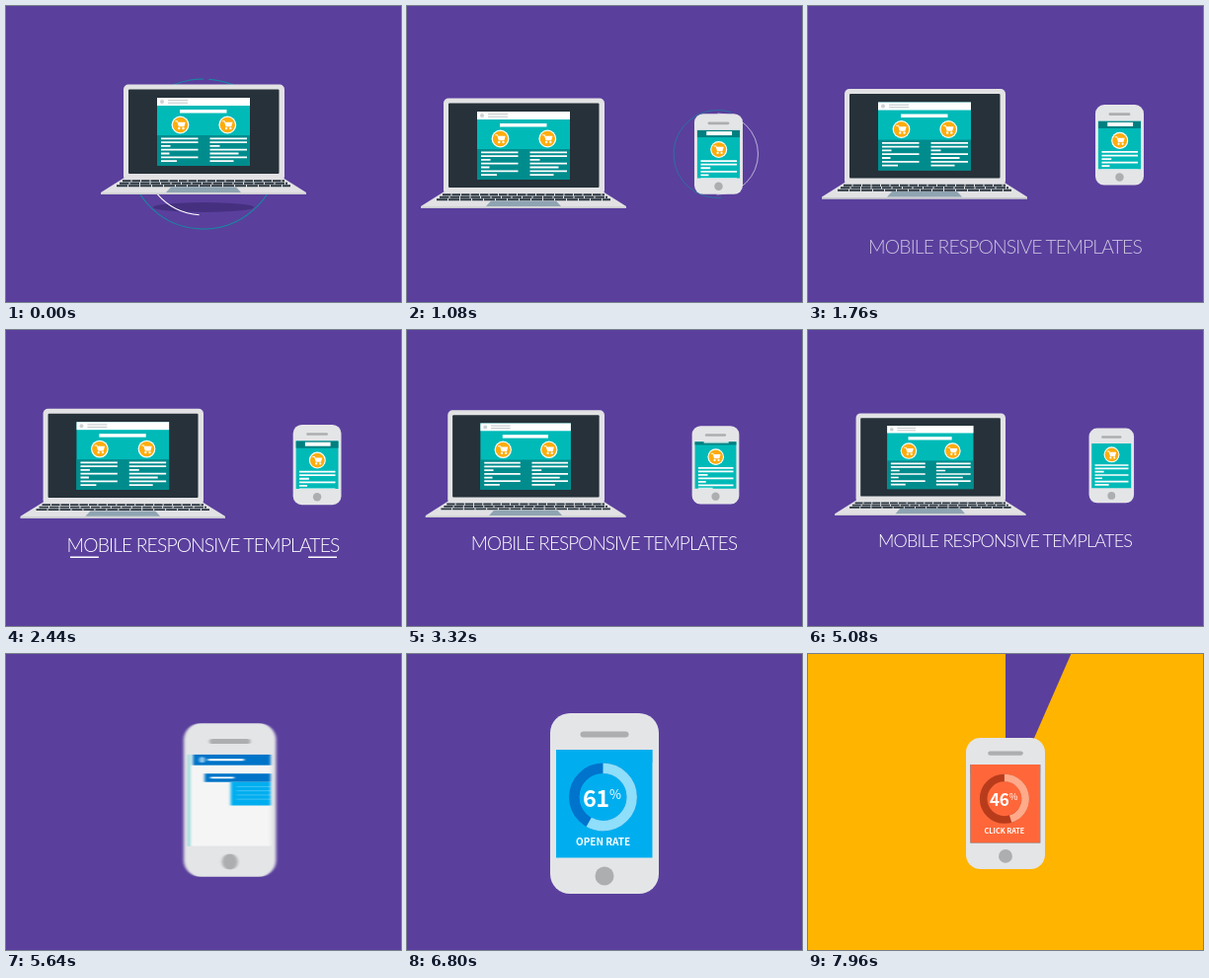
Recreate the animation shown at these times as an HTML page. Size 400 by 300 pixels, loop 8 s.

```html
<!DOCTYPE html>
<html lang="en">
<head>
<meta charset="utf-8">
<title>Mobile responsive templates</title>
<style>
  html, body { margin: 0; width: 100%; height: 100%; overflow: hidden; background: #5a3f9d; }
  svg { display: block; width: 100vw; height: 100vh; }
  .headline { font: 300 19.4px Lato, "Open Sans", sans-serif; letter-spacing: -.88px; fill: #fff; text-anchor: middle; }
  .gauge { font-family: "Noto Sans CJK JP", "Noto Sans CJK SC", "Noto Sans", sans-serif; fill: #fff; }
  .value { font-size: 23.5px; font-weight: 600; letter-spacing: -.6px; text-anchor: end; }
  .percent { font-size: 13px; font-weight: 500; }
  .label { font-size: 10px; font-weight: 600; text-anchor: middle; }
  .ring { fill: none; stroke-width: 10.5; }
  .orbit { fill: none; stroke-width: 1; }
  .teal { stroke: #108ea0; }
  .white { stroke: #fff; }
  #orbits .orbit { stroke-width: .6; }
  .copy { fill: none; stroke: #fff; }
</style>
</head>
<body>
<svg id="stage" viewBox="0 0 400 300"></svg>
<script>
const gauge = (id, back, track, light, label) => `
  <g id="${id}" class="gauge">
    <rect class="back" x="-50" y="-56" width="100" height="112" fill="${back}"/>
    <g class="dial">
      <g transform="translate(-1.5 -6.5)">
        <circle class="ring" r="29.2" stroke="${track}"/>
        <circle class="ring arc" r="29.2" stroke="${light}" pathLength="360"/>
      </g>
      <text class="value" x="4.5" y="3.5"></text>
      <text class="percent" x="5" y="-4.5">%</text>
      <text class="label" x="-1.5" y="42.5">${label}</text>
    </g>
  </g>`;

const orbit = (id, color, x, y, r) =>
  `<g transform="translate(${x} ${y})"><circle id="${id}" class="orbit ${color}" r="${r}" pathLength="360"/></g>`;

// Evenly spaced lines of body copy.
const copy = (x, y, step, weight, widths) =>
  `<path class="copy" stroke-width="${weight}" d="${widths.map((w, i) => `M${x} ${y + i * step}h${w}`).join('')}"/>`;

document.getElementById('stage').innerHTML = `
<defs>
  <clipPath id="screen"><rect x="-49" y="-54.5" width="97.5" height="109.5"/></clipPath>
  <filter id="smear" filterUnits="userSpaceOnUse" x="0" y="0" width="400" height="300" color-interpolation-filters="sRGB">
    <feGaussianBlur id="blur" stdDeviation="0"/>
  </filter>
  <g id="cart">
    <circle r="8.9" fill="#fff"/><circle r="7.7" fill="#ffac0c"/>
    <path d="M-5.2-4.2h2.400l.7 1.400h7.300l-1.300 4.600h-5.600l-1.500-5h-2z" fill="#fff"/>
    <circle cx="-1.200" cy="3.500" r="1.200" fill="#fff"/><circle cx="3" cy="3.500" r="1.200" fill="#fff"/>
  </g>
</defs>
<rect width="400" height="300" fill="#5a3f9d"/>
<circle id="wipe" r="150" fill="none" stroke="#ffb400" stroke-width="300" pathLength="360"/>
<ellipse id="shadow" cx="200" cy="204" rx="51" ry="5" fill="#45307f"/>
${orbit('bigTeal', 'teal', 200, 150, 76)}
${orbit('bigWhite', 'white', 200, 150, 62)}
<g id="orbits">
  ${orbit('smallTeal', 'teal', 0, 0, 44.5)}
  ${orbit('smallWhite', 'white', 0, 0, 41)}
</g>
<g id="desk">
  <g id="laptop">
    <rect x="119" y="79.500" width="163" height="98" rx="5" fill="#e2e2e4"/>
    <rect x="124" y="84.500" width="152.500" height="85.500" rx="1" fill="#263139"/>
    <rect x="153" y="93" width="94" height="69" fill="#00bab8"/>
    <rect x="153" y="131" width="94" height="31" fill="#008c8d"/>
    <rect x="153" y="93" width="94" height="8" fill="#fff"/>
    <circle cx="158" cy="97" r="2" fill="#ccd1d4"/>
    <path d="M164 95.700h20M164 98.200h20" stroke="#c3c8cb"/>
    <rect x="176" y="105" width="47.500" height="3.500" fill="#fff"/>
    <use href="#cart" x="176.500" y="120.500"/><use href="#cart" x="224.300" y="120.500"/>
    ${copy(157, 134.3, 3.8, 1.8, [37.5, 37.5, 9.5, 37.5, 8.5, 37.5, 16])}
    ${copy(206.5, 134.3, 3.8, 1.8, [37.5, 37.5, 10, 37.5, 29, 37.5, 24])}
    <path d="M119 174.500H281L304 189V191H96V189Z" fill="#e2e2e4"/>
    <path d="M96 189.500H304V191H96Z" fill="#c9cbce"/>
    <g stroke="#2b3640" stroke-width="1.900">
      <path d="M118 177.200H282" stroke-dasharray="8.500 1"/>
      <path d="M115 179.700H285" stroke-dasharray="9.500 1"/>
      <path d="M112 182.200H288" stroke-dasharray="11 1"/>
    </g>
    <path d="M167 183.500H233L238 189H162Z" fill="#8fa4b2"/>
  </g>
  <g id="title">
    <text class="headline" x="199.500" y="225">MOBILE RESPONSIVE TEMPLATES</text>
    <path id="rules" class="copy" stroke-width="1.400"/>
  </g>
</g>
<g id="phoneLayer">
  <g id="phone">
    <rect x="-55" y="-91.500" width="110" height="183" rx="20" fill="#e4e5e7"/>
    <rect x="-24.500" y="-73" width="49" height="6" rx="3" fill="#acaeb0"/>
    <circle cy="73.500" r="9.500" fill="#acaeb0"/>
    <g clip-path="url(#screen)">
      <g id="shop">
        <rect x="-49" y="-54.500" width="97.500" height="150" fill="#00bab8"/>
        <g id="scroll">
          <rect x="-49" y="-54.500" width="97.500" height="16.500" fill="#007f80"/>
          <rect x="-28" y="-51.500" width="58" height="9" fill="#fff"/>
          <use href="#cart" transform="translate(0 -10) scale(2.150)"/>
          ${copy(-41, 16, 8, 4, [82, 82, 22, 82, 18, 82, 34])}
        </g>
      </g>
      <rect id="mail" x="-49" y="-54.500" width="97.500" height="109.500" fill="#f5f5f5"/>
      <g id="header">
        <rect x="-49" y="-54.500" width="97.500" height="13" fill="#0074c8"/>
        <circle cx="-38" cy="-48" r="3.500" fill="#8fc6ec"/>
        <path class="copy" stroke-width="2.500" d="M-31-48h43"/>
      </g>
      <g id="card">
        <rect x="-43" y="-31.500" width="86" height="10" fill="#0074c8"/>
        <path class="copy" stroke-width="2" d="M-36-26.500h28"/>
      </g>
      <g id="block">
        ${gauge('open', '#00aeef', '#0073cd', '#8fdefa', 'OPEN RATE')}
        <g id="stripes">${copy(-36, -16, 5, 1, [70, 66, 70, 40])}</g>
      </g>
      ${gauge('click', '#ff673a', '#b83c1c', '#ffaa8b', 'CLICK RATE')}
    </g>
  </g>
</g>`;

const $ = id => document.getElementById(id);
const ramp = (t, a, b) => Math.min(1, Math.max(0, (t - a) / (b - a)));
const mix = (a, b, p) => a + (b - a) * p;
const inOut = u => u < .5 ? 4 * u ** 3 : 1 - 4 * (1 - u) ** 3;
const sine = u => (1 - Math.cos(Math.PI * u)) / 2;
const out = u => 1 - (1 - u) ** 2;
const move = (id, x, y = 0, s = 1) => $(id).setAttribute('transform', `translate(${x} ${y}) scale(${s})`);
const fade = (id, o) => $(id).setAttribute('opacity', o);

// Clockwise arc, in degrees from the top.
function arc(el, from, length) {
  el.setAttribute('transform', `rotate(${from - 90})`);
  el.setAttribute('stroke-dasharray', `${length} 800`);
  el.setAttribute('visibility', length > 0 ? 'visible' : 'hidden');
}

function setGauge(id, p, value, degrees) {
  const root = $(id);
  root.querySelector('.value').textContent = Math.round(value * p);
  arc(root.querySelector('.arc'), 0, degrees * p);
}

function drawOrbits(t) {
  const white = mix(184, 360, sine(ramp(t, 0, 260)));
  const teal = mix(4, 360, ramp(t, 0, 460) ** 1.3);
  arc($('bigWhite'), white, 360 - white);
  arc($('bigTeal'), teal, 360 - teal);
  fade('shadow', 1 - ramp(t, 120, 480));

  const grow = 360 * sine(ramp(t, 880, 1280));
  const cut = 360 * sine(ramp(t, 1260, 1640));
  move('orbits', 314.5, 150, mix(1, 1.12, ramp(t, 1080, 1640)));
  arc($('smallWhite'), cut, grow - cut);
  arc($('smallTeal'), 175 + cut, Math.min(360, grow * 1.12) - cut);
}

function drawDesk(t, zoom, rise) {
  const aside = inOut(ramp(t, 320, 1000));
  const leave = -340 * ramp(t, 5160, 5560) ** 3;
  move('desk', 200 * (1 - zoom) + leave, 150 * (1 - zoom), zoom);
  move('laptop', -82 * aside, 14 * (aside - rise));
  move('title', 0, 80 * (1 - rise));
  fade('title', ramp(t, 1540, 1860));
  const rule = 29 * sine(ramp(t, 2120, 2420)) * (1 - sine(ramp(t, 2640, 3040)));
  $('rules').setAttribute('d', rule ? `M64.500 230.500h${rule}M335.500 230.500h${-rule}` : '');
}

function drawPhone(t, zoom, rise) {
  const pop = inOut(ramp(t, 460, 900));
  const near = inOut(ramp(t, 5280, 5880));
  const shrink = mix(1, .727, inOut(ramp(t, 6960, 7560)));
  const x = mix(200 + 115.5 * zoom, 200, near);
  const y = mix(150 - 13.5 * rise * zoom, 151.5, near);
  move('phone', x, y, mix(.4455 * zoom * pop, 1, near) * shrink);
  $('phone').setAttribute('visibility', pop > 0 ? 'visible' : 'hidden');

  const speed = 4 * near * (1 - near);
  if (speed > .01) {
    $('blur').setAttribute('stdDeviation', `${2.4 * speed} ${.6 * speed}`);
    $('phoneLayer').setAttribute('filter', 'url(#smear)');
  } else $('phoneLayer').removeAttribute('filter');
}

function drawScreen(t) {
  move('scroll', 0, -17 * sine(ramp(t, 2700, 3900)));
  const slide = delay => 98 * (1 - inOut(ramp(t, 5380 + delay, 5720 + delay)));
  move('shop', slide(-30) - 97.5);
  move('mail', slide(-30));
  move('header', slide(0));
  move('card', slide(30));
  move('block', slide(85));

  const fill = inOut(ramp(t, 5860, 6120));
  const back = $('open').querySelector('.back');
  const box = { x: [-43, -50], y: [-21.5, -56], width: [86, 100], height: [28, 112] };
  for (const key in box) back.setAttribute(key, mix(...box[key], fill));
  fade('stripes', .3 * (1 - fill));
  $('open').querySelector('.dial').setAttribute('opacity', ramp(t, 5980, 6120));
  setGauge('open', out(ramp(t, 6060, 6800)), 61, 209.5);

  move('click', 100 * (1 - inOut(ramp(t, 6920, 7240))));
  setGauge('click', out(ramp(t, 7180, 7960)), 46, 162);
}

function drawWipe(t) {
  arc($('wipe'), 0, 360 * sine(ramp(t, 7460, 8060)));
  $('wipe').setAttribute('transform', 'translate(200 151.500) scale(-1 1) rotate(-90)');
}

function frame(now) {
  const t = Math.max(0, now - start) % 8000;
  const zoom = 1 - .0255 * Math.max(0, t - 2300) / 1000;
  const rise = inOut(ramp(t, 1420, 2020));
  drawOrbits(t);
  drawDesk(t, zoom, rise);
  drawPhone(t, zoom, rise);
  drawScreen(t);
  drawWipe(t);
  requestAnimationFrame(frame);
}

const start = performance.now();
frame(start);
</script>
</body>
</html>
```
